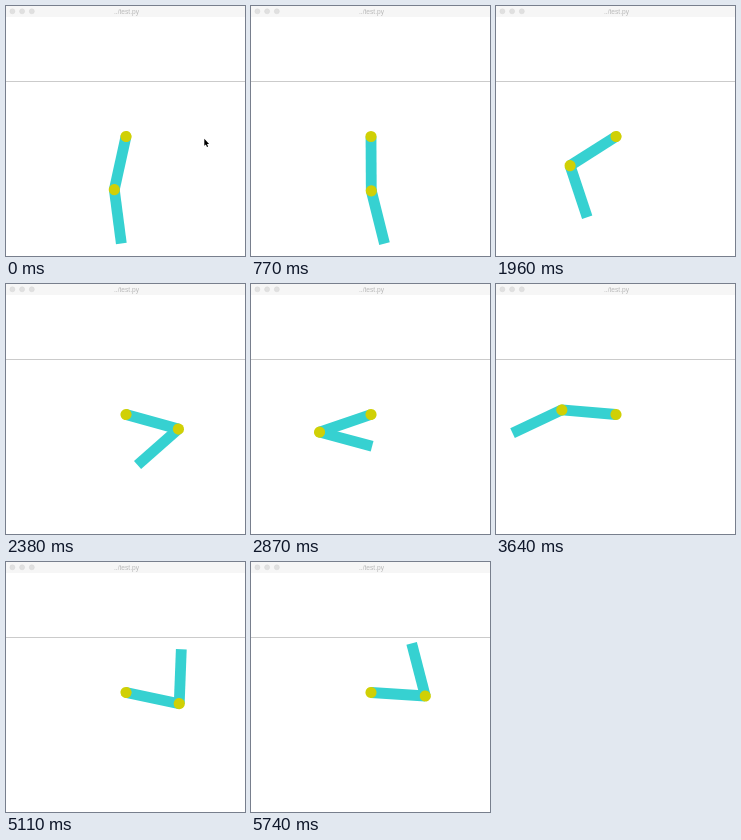
An HTML page that plays this animation: 239x250 px, repeating every 5810 ms.

```html
<!DOCTYPE html>
<html lang="en">
<head>
<meta charset="utf-8">
<title>Two-link pendulum</title>
<style>
  html, body { margin: 0; height: 100%; overflow: hidden; background: #fff; }
  svg { display: block; width: 100%; height: 100%; }
  text { font: 6.6px "Liberation Sans", Arial, sans-serif; fill: #b9b9b9; text-anchor: middle; }
  .link { fill: #36d1d1; }
  .joint { fill: #d0d005; }
  .button { fill: #e0e0e0; stroke: #d6d6d6; stroke-width: .5; }
</style>
</head>
<body>
<svg viewBox="0 0 239 250">
  <rect width="239" height="11" fill="#f6f6f6"/>
  <circle class="button" cx="6.4" cy="5.3" r="2.5"/>
  <circle class="button" cx="16.1" cy="5.3" r="2.5"/>
  <circle class="button" cx="25.8" cy="5.3" r="2.5"/>
  <text x="120.5" y="7.9">../test.py</text>
  <rect y="75" width="239" height="1" fill="#cbcbcb"/>
  <g id="upper">
    <rect class="link" x="-5.4" width="10.8" height="54.4"/>
    <circle class="joint" r="5.6"/>
  </g>
  <g id="lower">
    <rect class="link" x="-5.4" width="10.8" height="54.4"/>
    <circle class="joint" r="5.6"/>
  </g>
  <path id="cursor" d="M198.3 132.8v7l1.6-1.4 1.1 2.6 1.1-.5-1.1-2.5h2.1z"/>
</svg>
<script>
const TICK = 70, TICKS = 83, LENGTH = 54.4, PIVOT = [120, 130.5];

// Key points [step, angle]; radians from straight down, positive to the right.
// The upper link swings from one turning point to the next.
const upperKeys = [
  [-3, .01], [2, -.34], [7, .5], [13.8, -.7], [20.5, .96], [28, -1.105], [33, 1.3], [38.7, -1.469],
  [44.6, .37], [51, -1.654], [57.5, 1.35], [62, -1.506], [70.5, 1.4], [76.6, -.5], [81, 1.81]
];
// The lower link rocks, whirls over the top twice, then falls back.
const lowerKeys = [
  [-3, 0], [2, .2], [7, -.05], [13.8, .666], [20.5, -.5], [28, .362], [33, -.85], [36, .62], [40, 1.31],
  [44, 1.6], [47, 3.2], [51, 5.151], [57, 8.03], [62, 12.046], [71, 15.67], [75, 12.97], [80, 9.678]
];

// Speed at a key point: zero at the ends and where the motion turns back
function speed(keys, i) {
  const a = keys[i - 1], b = keys[i], c = keys[i + 1];
  if (!a || !c || (b[1] - a[1]) * (c[1] - b[1]) <= 0) return 0;
  return (c[1] - a[1]) / (c[0] - a[0]);
}

// Cubic Hermite curve through the key points
function angleAt(keys, step) {
  const i = keys.findIndex(key => key[0] >= step) - 1;
  const [t0, a0] = keys[i], [t1, a1] = keys[i + 1];
  const h = t1 - t0, u = (step - t0) / h;
  return a0 + (a1 - a0) * u * u * (3 - 2 * u)
    + h * u * (1 - u) * (speed(keys, i) * (1 - u) - speed(keys, i + 1) * u);
}

const [upper, lower, cursor] = ["upper", "lower", "cursor"].map(id => document.getElementById(id));

function place(link, x, y, angle) {
  link.setAttribute("transform", `translate(${x} ${y}) rotate(${-angle * 180 / Math.PI})`);
}

const start = performance.now();
function draw() {
  const tick = Math.floor((performance.now() - start) / TICK) % TICKS;
  // The first pose and the one at tick 52 are held for two ticks
  const step = tick - (tick > 0) - (tick > 52);
  const a = angleAt(upperKeys, step), b = angleAt(lowerKeys, step), [x, y] = PIVOT;
  place(upper, x, y, a);
  place(lower, x + LENGTH * Math.sin(a), y + LENGTH * Math.cos(a), b);
  cursor.style.display = step ? "none" : "";
  requestAnimationFrame(draw);
}
draw();
</script>
</body>
</html>
```
